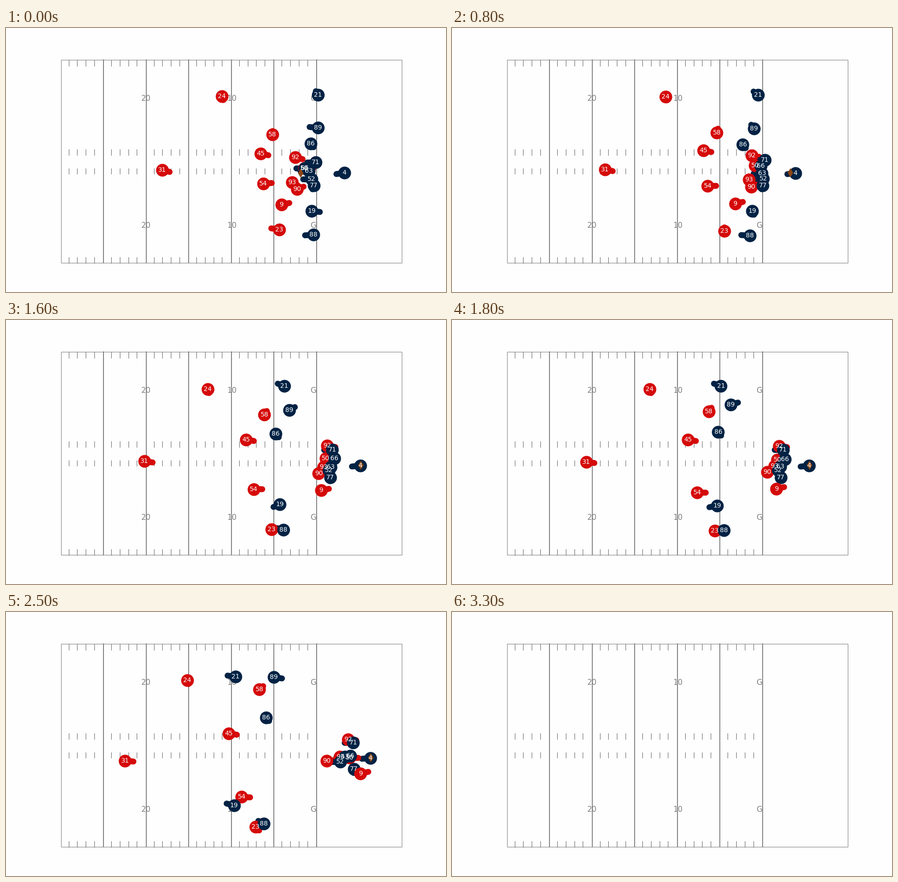
A matplotlib script for the animation above (3700 ms loop, 966 px wide and 580 px high).

```python
import matplotlib.pyplot as plt
import numpy as np
from matplotlib.animation import FuncAnimation
from matplotlib.patches import Rectangle

W, H, DPI = 966, 580, 100
FRAMES, INTERVAL, END = 37, 100, 33
PLAY = 2.9      # seconds from start to end point
DELAY = 0.4     # reaction time before a run
RED, NAVY, BROWN, GRAY = "#d50a0a", "#002244", "#8b4513", "#808080"
LEFT, RIGHT, TOP, BOTTOM = 120.5, 869.1, 69.6, 516.2
YARD = np.array([(RIGHT - LEFT) / 40, (BOTTOM - TOP) / 53.3])

plt.rcParams["font.family"] = "DejaVu Sans"
fig = plt.figure(figsize=(W / DPI, H / DPI), dpi=DPI, facecolor="#fefefe")
ax = fig.add_axes([0, 0, 1, 1])
ax.set(xlim=(0, W), ylim=(H, 0))
ax.axis("off")


def pt(px):
    return px * 72 / DPI


def draw_field():
    ax.add_patch(Rectangle((LEFT, TOP), RIGHT - LEFT, BOTTOM - TOP,
                           fill=False, ec=GRAY, lw=0.8, zorder=1))
    for yard in range(1, 31):
        x = LEFT + yard * YARD[0]
        if yard % 5 == 0:
            ax.plot([x, x], [TOP, BOTTOM], color="dimgray", lw=1.2, zorder=1)
            continue
        for y in (70, 266, 307.5, 503):
            ax.plot([x - 1.6] * 2, [y, y + 13.5], color="dimgray", lw=0.8,
                    solid_capstyle="butt", zorder=1)
    for label, x in (("20", 307), ("10", 495.5), ("G", 674.5)):
        for y in (152.5, 432):
            ax.text(x, y, label, color=GRAY, fontsize=12, ha="center",
                    va="center_baseline", zorder=1.5)


def settle(t):
    """Speed up, then slow down: blocks, rushes and short routes."""
    u = min(t / PLAY, 1)
    return u * u * (3 - 2 * u)


def burst(t):
    """Wait, then keep gaining speed: deep runs."""
    return max((t - DELAY) / (PLAY - DELAY), 0) ** 1.6


class Player:
    """Runs from start to end; bend bows the path, turn is (first, last) heading."""

    def __init__(self, color, number, start, end, ease=settle, bend=(0, 0),
                 turn=None, z=3):
        self.start, self.end, self.bend = map(np.array, (start, end, bend))
        self.ease = ease
        self.turn = turn or ((0, 0) if color == RED else (180, 180))
        self.nose, = ax.plot([], [], color=color, lw=pt(13),
                             solid_capstyle="round", zorder=2)
        self.body, = ax.plot([], [], "o", color=color, ms=pt(28), mew=0, zorder=z)
        self.label = ax.text(0, 0, str(number), color="white", fontsize=10,
                             ha="center", va="center", zorder=6)
        self.artists = [self.nose, self.body, self.label]

    def at(self, t):
        e = self.ease(t)
        return self.start + (self.end - self.start) * e + self.bend * 4 * e * (1 - e)

    def move(self, t):
        x, y = self.at(t)
        a = np.radians(np.interp(t, (0, PLAY), self.turn))
        dx, dy = YARD * (np.cos(a), np.sin(a))
        self.nose.set_data([x, x + dx], [y, y + dy])
        self.body.set_data([x], [y])
        self.label.set_position((x, y))


class Ball:
    """Snapped to the passer, carried, then thrown."""
    spot, hand, velocity = map(np.array, ((647, 319), (1, -1), (-335, 100)))
    catch, release = 0.9, 2.7

    def __init__(self, passer):
        self.passer = passer
        self.mark, = ax.plot([], [], "d", color=BROWN, ms=10, mew=0, zorder=5)
        self.artists = [self.mark]

    def move(self, t):
        held = self.passer.at(min(t, self.release)) + self.hand
        snap = min(t / self.catch, 1)
        flight = max(t - self.release, 0)
        x, y = self.spot + (held - self.spot) * snap + self.velocity * flight
        self.mark.set_data([x], [y])


draw_field()

passer = Player(NAVY, 4, (743, 318), (803, 321), turn=(160, 170))
actors = [
    # Defence
    Player(RED, 24, (474, 150), (373, 146), burst, (0, 4), (80, 80)),
    Player(RED, 58, (585, 234), (558, 150), burst, (-11, 0), (270, 300)),
    Player(RED, 45, (559, 276), (483, 268), bend=(12, -9), turn=(25, 20)),
    Player(RED, 31, (343, 312), (245, 345), burst, (-10, -14), (30, 10)),
    Player(RED, 54, (565, 342), (505, 421), burst, (-3, 6), (350, 370)),
    Player(RED, 23, (600, 443), (523, 473), burst, (8, 9), (200, 460)),
    Player(RED, 92, (635, 284), (757, 281), bend=(0, -6), turn=(30, 10)),
    Player(RED, 50, (655, 308), (763, 324), bend=(-16, -14)),
    Player(RED, 93, (628, 339), (738, 318), bend=(6, -4), turn=(50, 0)),
    Player(RED, 90, (639, 354), (706, 325), bend=(9, 0), turn=(320, 360)),
    Player(RED, 9, (605, 388), (806, 344), burst, (29, 0), (335, 335), z=4),
    # Receivers
    Player(NAVY, 21, (685, 147), (446, 141), burst, turn=(255, 190)),
    Player(NAVY, 89, (685, 219), (584, 133), bend=(-5, 29), turn=(190, 410)),
    Player(NAVY, 86, (669, 254), (570, 228), bend=(-20, 11), turn=(70, 70)),
    Player(NAVY, 19, (671, 402), (446, 443), burst, (0, -11), (15, 240)),
    Player(NAVY, 88, (675, 454), (560, 466), turn=(170, 240)),
    # Line
    Player(NAVY, 71, (680, 295), (770, 288), bend=(-16, -6)),
    Player(NAVY, 66, (656, 308), (761, 319), bend=(4, -11)),
    Player(NAVY, 63, (665, 314), (748, 317), bend=(0, 7)),
    Player(NAVY, 52, (671, 332), (737, 329)),
    Player(NAVY, 77, (676, 346), (792, 345), burst, turn=(100, 90)),
    passer,
    Ball(passer),
]


def update(n):
    playing = n < END
    for actor in actors:
        for artist in actor.artists:
            artist.set_visible(playing)
        if playing:
            actor.move(n * INTERVAL / 1000)
    return []


anim = FuncAnimation(fig, update, frames=FRAMES, interval=INTERVAL,
                     repeat=True, repeat_delay=0, blit=False)
plt.show()
```
